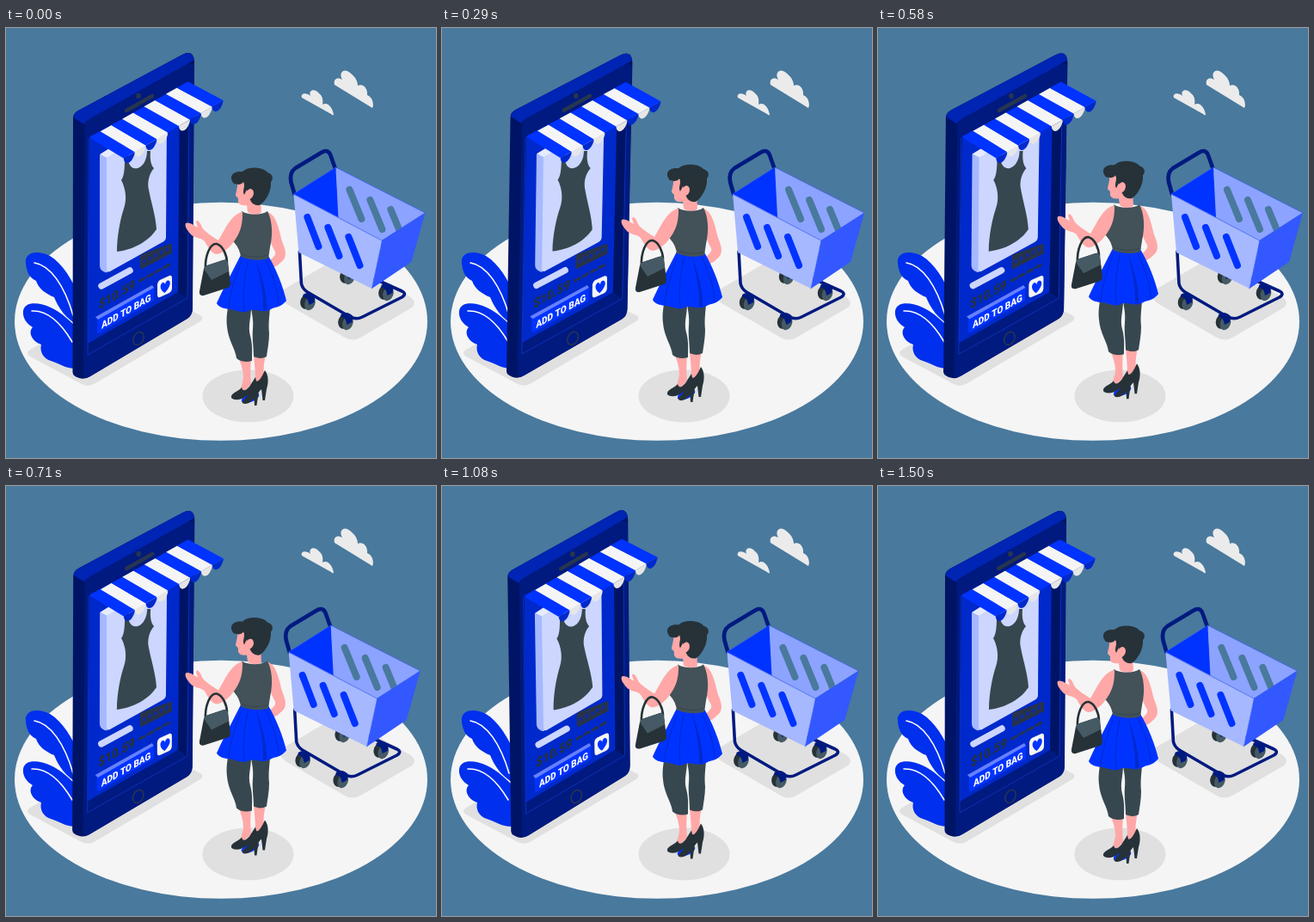
An HTML page with a canvas that plays this animation: 500x500 px, repeating every 1.54 s.

```html
<!DOCTYPE html>
<html lang="en">
<head>
<meta charset="utf-8">
<title>Mobile shopping</title>
<style>
html, body { margin: 0; width: 100%; height: 100%; overflow: hidden; background: #49799d; }
canvas { display: block; width: 100%; height: 100%; }
</style>
</head>
<body>
<canvas id="stage" width="500" height="500"></canvas>
<script>
const ctx = document.getElementById('stage').getContext('2d');
const LOOP = 1540, FRAME = 1000 / 24, FRAMES = 36;
const SKY = '#49799d', BLUE = '#0033ff', MID_BLUE = '#0029cc', NAVY = '#001a80', DEEP = '#001466';
const SKIN = '#ffa8a7', DARK = '#263238', SLATE = '#37474f', SHADE = '#e0e0e0', PALE = '#ccd6ff';
const SHAKE = [0, -2, 4, -5, 8, -11, 8, -5, 4, -2, 0];

function fill(color, path) {
  ctx.fillStyle = color;
  ctx.fill(new Path2D(path));
}

function line(color, width, path, cap = 'round') {
  ctx.strokeStyle = color;
  ctx.lineWidth = width;
  ctx.lineCap = cap;
  ctx.lineJoin = 'round';
  ctx.stroke(new Path2D(path));
}

function oval(color, x, y, rx, ry, turn = 0) {
  ctx.fillStyle = color;
  ctx.beginPath();
  ctx.ellipse(x, y, rx, ry, turn, 0, Math.PI * 2);
  ctx.fill();
}

// Text lying on the isometric plane of the screen.
function isoText(text, x, y, size, color) {
  ctx.save();
  ctx.transform(0.866, -0.5, 0, 1, x, y);
  ctx.font = `900 ${size}px Roboto, sans-serif`;
  ctx.fillStyle = color;
  ctx.fillText(text, 0, 0);
  ctx.restore();
}

function moved(dx, dy, draw) {
  ctx.save();
  ctx.translate(dx, dy);
  draw();
  ctx.restore();
}

function rotated(angle, x, y, draw) {
  ctx.save();
  ctx.translate(x, y);
  ctx.rotate(angle);
  ctx.translate(-x, -y);
  draw();
  ctx.restore();
}

function drawScene() {
  ctx.fillStyle = SKY;
  ctx.fillRect(0, 0, 500, 500);
  oval('#f5f5f5', 250, 341.3, 240, 138.5);
  fill(SHADE, 'M28 374Q22 378 28 382L88 414Q96 418 104 413L226 341Q231 337 226 334L200 322L60 356Z');
  oval(SHADE, 281.5, 428, 53, 30.5);
  fill(SHADE, 'M323 304L388 266L469 312Q479 319 472 325L412 360Q403 365 394 360L325 320Q314 311 323 304Z');
  fill('#ebebeb', 'M382 66C380 58 387 57 391 60C386 51 394 46 400 52C404 55 409 60 409 67C414 64 421 69 420 78C427 80 428 91 426 93Z');
  fill('#ebebeb', 'M344 81C342 75 350 75 354 79C351 71 360 70 364 76C368 79 369 84 368 89C374 85 380 93 381 101Q380 102 378 100Z');
}

function drawPlant() {
  const leaf = '#002fee';
  fill(leaf, 'M23 274C21 260 37 258 51 265C66 274 77 293 84 310V346C70 338 61 326 56 313C46 309 38 303 35 294C26 290 24 282 23 274Z');
  fill(leaf, 'M20 329C22 317 39 319 52 325C64 330 76 342 84 350V396C70 397 62 390 52 387C43 384 39 376 41 368C31 365 25 354 31 348C24 344 19 337 20 329Z');
  line('#fff', 1.6, 'M33 273C52 276 68 300 78 334');
  line('#fff', 1.6, 'M30 329C48 328 64 343 77 365');
}

function drawAwning() {
  const step = 12.85;
  for (let i = 0; i < 9; i++) {
    const blue = i % 2 === 0;
    const top = 97 + i * 12.7, topY = 127.5 - i * 7.25;
    const x = 136.7 + i * step, y = 151.5 - i * 7.5;
    fill(blue ? MID_BLUE : '#e6e6e6',
      `M${x} ${y}C${x + 1} ${y + 10} ${x + 11} ${y + 6} ${x + step + .4} ${y - 7.5}Z`);
    fill(blue ? BLUE : '#f5f5f5',
      `M${top} ${topY}L${top + 12.9} ${topY - 7.3}L${x + step + .2} ${y - 7.5}L${x} ${y}Z`);
  }
}

function drawDress() {
  fill(SLATE, 'M138 150L142 148C141 158 146 165 153 163C160 161 164 152 164 143L168 143C167 154 169 160 172 163C166 170 164 180 166 188C169 204 174 218 175 234C166 248 148 258 129 260C129 242 133 222 137 210C141 199 139 186 134 177C138 172 138 160 138 150Z');
}

function drawPhone() {
  fill(DEEP, 'M78 105Q78 99 84 96L205 31Q218 24 219 39L217 326Q217 334 211 338L98 405Q89 411 79 404Q77 402 77.5 397Z');
  fill('#0024b3', 'M78.5 104Q79 98.5 84 96L205 31Q217 25 218.5 37L209 43L97 106Q92 109 91 112Z');
  fill(NAVY, 'M91.5 116Q91 110 97 106L209 43Q219 38 218.5 48L216.8 326Q216.5 334 210 338L98 405Q89 410 90 400Z');
  fill(DEEP, 'M96 126L213 62L211 314L95 380Z');
  fill(NAVY, 'M95 367L200 307L211 314L95 380Z');
  fill(MID_BLUE, 'M97 126L202 70L200 307L95 367Z');
  line('#1237c4', .8, 'M96 128L95 380L211 314L213 90', 'butt');
  line('#27354f', 4.5, 'M140 96L170 79');
  oval('#27354f', 154, 79, 2.8, 3.2);
  ctx.strokeStyle = '#27354f';
  ctx.lineWidth = 1.6;
  ctx.beginPath();
  ctx.ellipse(154, 361, 5.7, 8, .5, 0, Math.PI * 2);
  ctx.stroke();

  fill('#e6ebff', 'M109 147L120 140L130 145L118 152Z');
  fill('#a6b8ff', 'M109 147L118 151V284Q116 285 113 283Q109 281 109 276Z');
  fill(PALE, 'M117 151L187 108L186 243Q186 247 182 249L121 283Q117 285 117 280Z');
  drawDress();

  line(PALE, 7.5, 'M111 300L144 282');
  fill('#27334c', 'M156 266Q156 264 158 263L191 251Q193 250 193 252V262L158 280Q156 281 156 278Z');
  for (let i = 0; i < 5; i++) {
    const x = 159 + i * 6.6, y = 272 - i * 3.4;
    line(MID_BLUE, 1.1, `M${x} ${y}l3.6 -1.8M${x + 1.8} ${y - 3}v4.4`);
  }
  for (let i = 0; i < 4; i++) {
    line('#27334c', 3, `M${155.5 + i * 9.5} ${294 - i * 5.2}l5.5 -3`);
  }
  isoText('$10.59', 108, 327, 15.2, DARK);
  fill(BLUE, 'M106 337L172 301V317L108 355Q106 355 106 352Z');
  fill('#6680ff', 'M104 336L170 299L172 302L107 339Z');
  isoText('ADD TO BAG', 111, 350, 11.5, '#fff');
  fill('#f5f5f5', 'M176 298Q176 295 179 293L190 288Q193 287 193 291V303Q193 306 190 308L179 313Q176 314 176 310Z');
  fill(BLUE, 'M184.5 308C178 304 179 298 182 296Q184 295 185 298Q186 293 189 293.5C193 295 190 303 184.5 308Z');
  drawAwning();
}

function drawWheel(x, y) {
  oval(DARK, x - 1, y, 7, 9, .35);
  oval('#455a64', x + 3, y + 2, 6, 8.5, .35);
  fill(NAVY, `M${x - 5} ${y - 8}Q${x + 2} ${y - 13} ${x + 9} ${y - 6}L${x + 8} ${y + 1}L${x + 2} ${y + 4}Q${x + 1} ${y - 5} ${x - 5} ${y - 5}Z`);
}

function drawCart() {
  drawWheel(396, 288);
  drawWheel(441, 307);
  line(NAVY, 3.6, 'M341 260L343 297Q344 303 350 307L398 335Q406 340 414 336L460 313Q466 309 460 306L400 279');
  drawWheel(350, 318);
  drawWheel(394, 341);
  line(NAVY, 4.6, 'M335 193L331 179Q329 168 336 163L366 145Q374 140 377 148L383 165');
  fill(BLUE, 'M334 193L383 162L387 221Z');
  fill('#8ca3ff', 'M383 162L487 215L437 247L386 220Z');
  ctx.save();
  ctx.clip(new Path2D('M383 162L487 215L437 247L386 220Z'));
  line(SKY, 8, 'M399 188L413 222M423 200L437 234M447 211L461 245');
  ctx.restore();
  fill('#a6b8ff', 'M334 193L437 247L425 303L340 261Z');
  fill('#3358ff', 'M437 247L487 215L471 272L425 303Z');
  line('#3358ff', .6, 'M334 193L383 162L487 215L437 247ZM437 247L425 303');
  line(BLUE, 8, 'M350 220L363 254M374 232L387 265M398 243L411 276');
}

function drawLegs() {
  fill(SKIN, 'M270 382L285 384C284 396 284 404 285 414L274 425C271 421 276 412 276 406C276 398 273 390 270 382Z');
  fill(SKIN, 'M288 380L302 379C300 390 299 396 300 404L289 416C291 404 289 393 288 380Z');
  fill(SLATE, 'M258 325H285C285 338 281 346 284 358C287 368 286 378 286 387C280 389 272 388 268 384C267 374 258 362 257 347C256 338 257 332 258 325Z');
  fill(SLATE, 'M285 325H307C306 338 305 344 306 355C306 365 304 374 303 382C298 385 292 384 288 382C288 370 286 362 287 350C288 340 286 333 285 325Z');
  oval(BLUE, 284, 430, 11, 5, -.4);
  fill(DARK, 'M262 430C261 424 269 424 274 418Q276 425 283 417L290 406L293 419C286 425 281 427 276 430C271 433 265 433 262 430Z');
  fill(DARK, 'M275 436C274 432 284 430 290 410Q294 414 301 398C306 404 305 414 303 420L301 433H298.5L297 420C292 425 291 429 285 434C282 437 277 438 275 436Z');
  fill(DARK, 'M288 424L294 421L291.5 439H289Z');
}

function drawSkirt() {
  fill(BLUE, 'M273 264C283 269 297 269 305 265C314 280 322 300 326 317C320 325 313 324 308 327C298 333 289 325 282 329C274 333 264 326 259 327C252 326 247 324 245 320C253 302 264 282 273 264Z');
  fill(MID_BLUE, 'M291 270C295 290 300 308 299 328L303 328C304 308 297 288 291 270Z');
  line(MID_BLUE, 1, 'M273 272C267 290 260 308 259 325M281 272C277 292 275 310 277 329M302 270C310 286 316 304 317 321');
}

function drawHead() {
  fill(SKIN, 'M269 177C270 186 267 191 267 195L270 198C269 204 272 207 280 206L281 214C287 218 294 218 297 214L296 196L286 177Z');
  fill(DARK, 'M265 181C259 174 262 166 275 167C282 160 300 162 304 168C311 170 311 176 308 179C309 189 302 202 295 206Q287 207 284 200L280 188Q278 192 277 194C274 189 279 184 276 179C273 183 269 182 265 181Z');
  oval(SKIN, 283.5, 193, 4.3, 6, .3);
}

function drawBag() {
  line(DARK, 2.6, 'M232 281C231 266 237 250 245 251C252 253 257 264 257 273');
  fill(DARK, 'M230 280Q231 277 234 276L252 270Q257 268 258 273L261 297Q261 301 258 302L230 311Q224 312 225 306Z');
  fill('#455a64', 'M230 280Q231 277 234 276L252 270Q257 268 258 273L259 283L239 293Z');
}

function drawWoman() {
  drawLegs();
  fill(SKIN, 'M304 214C314 217 317 232 321 248C327 262 326 268 319 273C314 278 309 280 306 276L307 270C312 266 314 263 313 260C307 250 305 240 304 232Z');
  drawSkirt();
  drawHead();
  fill('#435158', 'M274 213C282 218 297 218 304 213C309 222 311 238 307 255L305 268C296 271 282 270 273 266C272 258 268 252 264 248C271 238 273 227 274 213Z');
  line(SLATE, 1, 'M274 263Q289 269 305 264');
  fill(SKIN, 'M275 214C262 216 255 234 247 247C240 242 232 238 228 232C226 226 222 221 221 226L223 232C218 229 212 225 209 227C207 231 212 237 216 241C222 245 227 244 231 248C235 255 239 263 246 263C256 261 266 249 271 238C275 229 275 221 275 214Z');
  drawBag();
}

function sample(stops, phase) {
  const at = phase * (stops.length - 1);
  const i = Math.min(Math.floor(at), stops.length - 2);
  return stops[i] + (stops[i + 1] - stops[i]) * (at - i);
}

function render(now) {
  const time = now % LOOP;
  const phase = Math.min(Math.floor((time + 5) / FRAME), FRAMES) / FRAMES;
  const tilt = sample([0, 1, 0, -1, 0], phase) * Math.PI / 180;
  drawScene();
  drawPlant();
  rotated(tilt, 165, 218, drawPhone);
  moved(sample(SHAKE, phase) + .4, 0, drawCart);
  moved(0, sample([0, -10, 0], phase), drawWoman);
}

let start;
function tick(now) {
  start ??= now;
  render(now - start);
  requestAnimationFrame(tick);
}
render(0);
requestAnimationFrame(tick);
</script>
</body>
</html>
```
